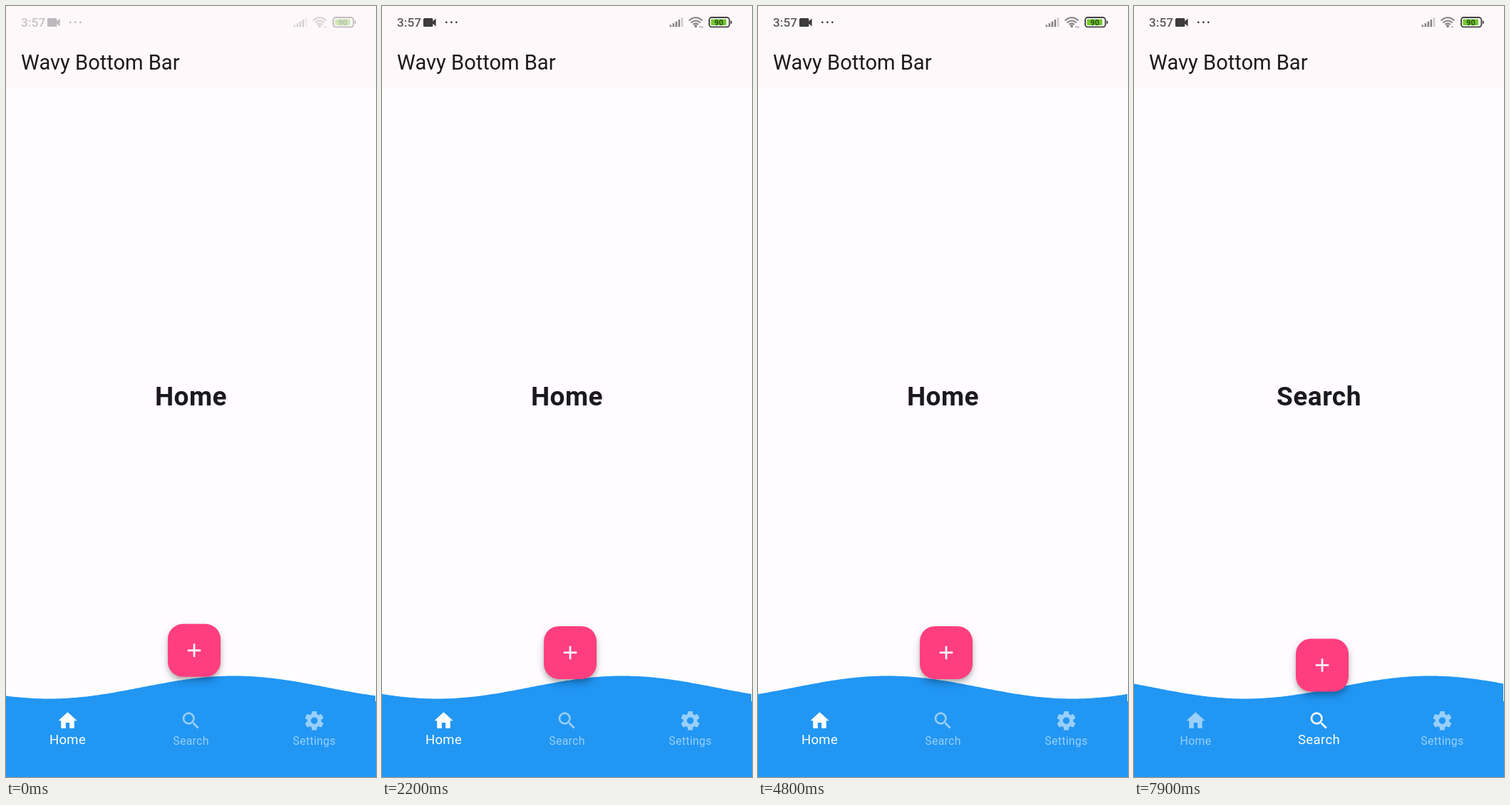
Animation, 519 px wide and 1079 px high, one loop 8000 ms. Source, as an HTML page:

```html
<!DOCTYPE html>
<html lang="en">
<head>
<meta charset="utf-8">
<title>Wavy Bottom Bar</title>
<style>
  html, body { margin: 0; width: 100%; height: 100%; overflow: hidden; background: #fffdff; }
  body { position: relative; }
  svg { display: block; position: absolute; left: 0; top: 0; }
  text { font-family: Roboto, sans-serif; }
  .mid { text-anchor: middle; }
  .title { font-size: 29.07px; fill: #1b191d; }
  .page { font-size: 37px; font-weight: 700; letter-spacing: .5px; fill: #1b191f; }
  .tab { fill: #fff; }
  .tab text { font-size: 18.5px; letter-spacing: .36px; text-anchor: middle; }
  .clock { font-size: 17.3px; font-weight: 500; fill: #5b585b; }
  .level { font-size: 11px; font-weight: 700; text-anchor: middle; fill: #2c4a14; }
  #fab {
    position: absolute; left: 226.5px; top: 0; width: 74px; height: 74px;
    border-radius: 21.1px; background: #ff3e80;
    box-shadow: 0 4px 6.5px -1px rgba(0,0,0,.22), 0 7px 12px rgba(0,0,0,.13), 0 1px 18px rgba(0,0,0,.06);
  }
</style>
</head>
<body>
<svg width="519" height="1079" viewBox="0 0 519 1079">
  <defs>
    <clipPath id="edge"><rect y="900" width="518" height="179"/></clipPath>
    <path id="tooth" d="M-2.95-6.4L-2.5-9.6Q-2.42-10-2-10H2Q2.42-10 2.5-9.6L2.95-6.4z"/>
  </defs>
  <rect width="519" height="116" fill="#fff8fb"/>

  <g id="status">
    <text class="clock" x="21" y="29">3:57</text>
    <g fill="#3d3b3e">
      <rect x="58" y="17" width="13.4" height="12" rx="1.6"/>
      <path d="M70.5 22L75.6 17.6V28.4L70.5 24z"/>
      <circle cx="90.3" cy="22.8" r="1.4"/>
      <circle cx="97.3" cy="22.8" r="1.4"/>
      <circle cx="104.3" cy="22.8" r="1.4"/>
    </g>
    <g fill="#858185">
      <path d="M403.5 26.5h2.6v2.8h-2.6zM407.5 24.3h2.6v5h-2.6zM411.5 21.8h2.6v7.5h-2.6zM415.5 19h2.6v10.3h-2.6z"/>
      <path fill="#cfcbcf" d="M419.6 16h2.6v13.3h-2.6z"/>
      <circle cx="440" cy="28" r="2.1"/>
      <path fill="none" stroke="#858185" stroke-width="2" d="M430.6 20.4Q440 12 449.4 20.4M433.4 23.4Q440 17.6 446.6 23.4M436.2 26Q440 22.8 443.8 26"/>
      <path d="M445 28.4h2.8l-1.4 2.4z"/>
      <path id="up" d="M448 30.6h2.6l-1.3-2.4z"/>
    </g>
    <rect x="459" y="16" width="28.4" height="13.4" rx="3.6" fill="#fff8fb" stroke="#434144" stroke-width="1.9"/>
    <rect x="461.4" y="18.4" width="21.6" height="8.6" rx="1.4" fill="#6fca2c"/>
    <path d="M489 20.2q1.8 0 1.8 2.5t-1.8 2.5z" fill="#434144"/>
    <text class="level" x="472.6" y="26.7">90</text>
  </g>

  <text class="title" x="21.1" y="89.3">Wavy Bottom Bar</text>
  <text class="page mid" id="page" x="259.5" y="558.8">Home</text>

  <g fill="#2196f3">
    <g clip-path="url(#edge)"><path id="wave"/></g>
    <rect y="973" width="519" height="106"/>
  </g>

  <g class="tab" transform="translate(86.5 0)">
    <path transform="translate(-15.86 984.4) scale(1.3216)" d="M10 20v-6h4v6h5v-8h3L12 3 2 12h3v8z"/>
    <text y="1032.6">Home</text>
  </g>
  <g class="tab" transform="translate(259.5 0)">
    <path transform="translate(-15.86 984.4) scale(1.3216)" d="M15.5 14h-.79l-.28-.27A6.47 6.47 0 0 0 16 9.5 6.5 6.5 0 1 0 9.5 16c1.61 0 3.09-.59 4.23-1.57l.27.28v.79l5 4.99L20.49 19zM9.5 14a4.5 4.5 0 1 1 0-9 4.5 4.5 0 0 1 0 9z"/>
    <text y="1032.6">Search</text>
  </g>
  <g class="tab" transform="translate(432.4 0)">
    <g transform="translate(0 1000.2) scale(1.3216)">
      <circle r="5.55" fill="none" stroke="#fff" stroke-width="3.9"/>
      <use href="#tooth"/>
      <use href="#tooth" transform="rotate(60)"/>
      <use href="#tooth" transform="rotate(120)"/>
      <use href="#tooth" transform="rotate(180)"/>
      <use href="#tooth" transform="rotate(240)"/>
      <use href="#tooth" transform="rotate(300)"/>
    </g>
    <text y="1032.6">Settings</text>
  </g>
</svg>

<div id="fab">
  <svg width="74" height="74" viewBox="0 0 74 74">
    <path fill="#fff" transform="translate(21.14 21.14) scale(1.3216)" d="M19 13h-6v6h-2v-6H5v-2h6V5h2v6h6z"/>
  </svg>
</div>

<script>
  const LOOP = 8000, STEP = 100, WIDTH = 519, TAU = 2 * Math.PI;
  const $ = id => document.getElementById(id);
  const wave = $('wave'), fab = $('fab'), page = $('page'), status = $('status'), up = $('up');
  const tabs = [...document.querySelectorAll('.tab')];

  // Two wavelengths with a crest at x = 0, so any shift covers the bar.
  let d = `M${-WIDTH} 1079`;
  for (let x = -WIDTH; x <= WIDTH; x += 3) {
    d += `L${x} ${(953.5 - 16 * Math.cos(TAU * x / WIDTH)).toFixed(2)}`;
  }
  wave.setAttribute('d', d + `V1079z`);

  const ease = p => p * p * (3 - 2 * p);
  const clamp = p => Math.min(1, Math.max(0, p));

  function setTab(tab, on) {
    const k = (12 + 2 * on) / 14, bottom = 1039.6;
    tab.style.opacity = 0.54 + 0.46 * on;
    tab.querySelector('text').setAttribute('transform',
      `translate(0 ${bottom}) scale(${k}) translate(0 ${-bottom})`);
  }

  function draw(ms) {
    const t = Math.floor(ms % LOOP / STEP) * STEP;
    const held = t < 400;
    const turns = ((held ? 267 : t) - 1500) / 2000;
    const crest = (Math.ceil(turns) - turns) * WIDTH;
    wave.setAttribute('transform', `translate(${crest} 0)`);
    fab.style.transform = `translateY(${879.4 + 19.6 * Math.cos(TAU * turns)}px)`;

    status.style.opacity = held ? 0.33 : 1;
    up.style.opacity = t < 5800 ? 1 : 0;

    const p = ease(clamp((t - 7640) / 200));
    page.textContent = t < 7700 ? 'Home' : 'Search';
    [1 - p, p, 0].forEach((on, i) => setTab(tabs[i], on));
  }

  let start;
  function tick(now) {
    start ??= now;
    draw(now - start);
    requestAnimationFrame(tick);
  }
  draw(0);
  requestAnimationFrame(tick);
</script>
</body>
</html>
```
